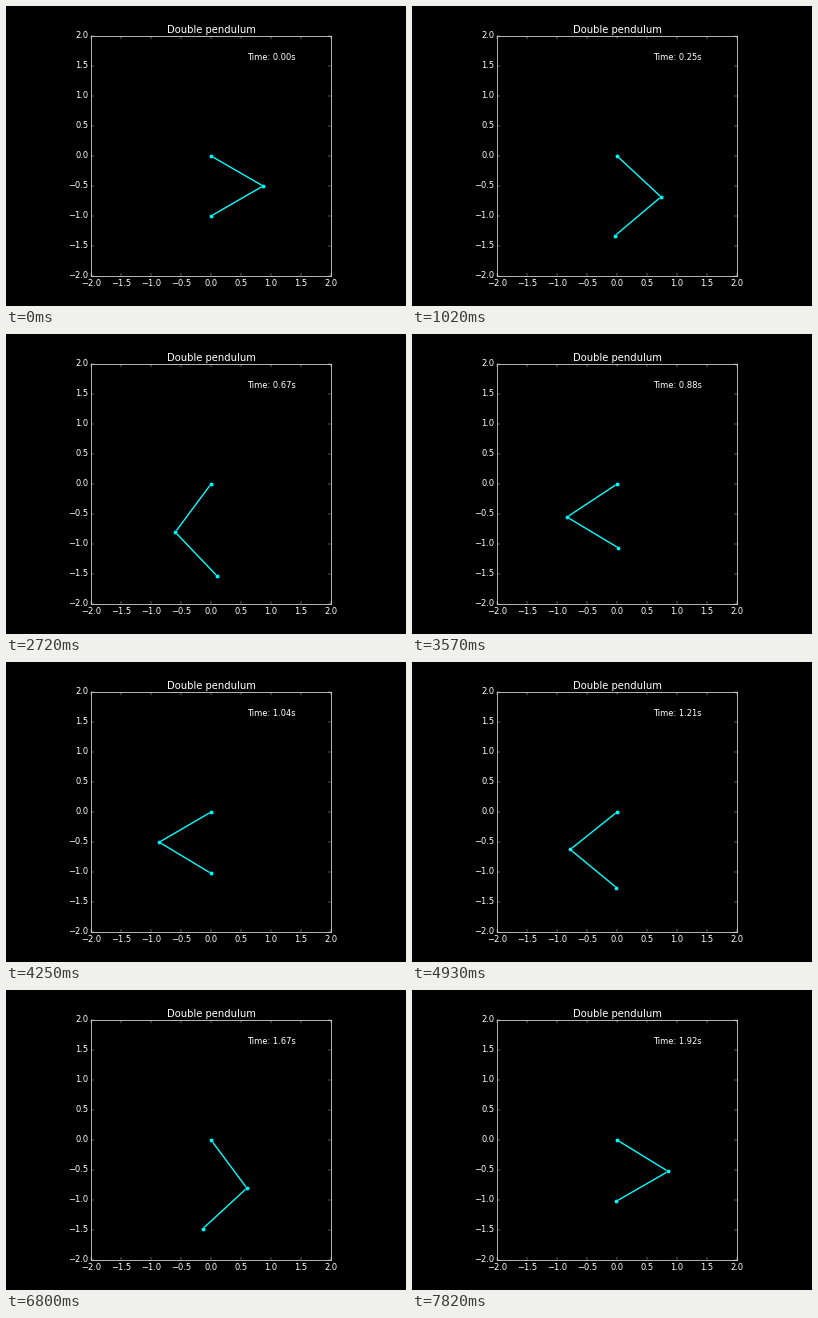
A matplotlib script for the animation above (7990 ms loop, 400 px wide and 300 px high).

```python
import numpy as np
import matplotlib.pyplot as plt
from matplotlib.animation import FuncAnimation

plt.style.use(["classic", "dark_background"])
plt.rcParams.update({"font.family": "DejaVu Sans", "savefig.dpi": "figure"})

G = 9.8            # gravity; both rods have length 1 and both bobs mass 1
FPS = 24           # simulated frames per second
FRAMES = 47
SUBSTEPS = 20


def deriv(state):
    """Equations of motion for state (angle 1, angle 2, rate 1, rate 2)."""
    a1, a2, w1, w2 = state
    c, s = np.cos(a1 - a2), np.sin(a1 - a2)
    f1 = -2 * G * np.sin(a1) - s * w2 ** 2
    f2 = -G * np.sin(a2) + s * w1 ** 2
    det = 2 - c * c
    return np.array([w1, w2, (f1 - c * f2) / det, (2 * f2 - c * f1) / det])


def rk4(state, h):
    k1 = deriv(state)
    k2 = deriv(state + h / 2 * k1)
    k3 = deriv(state + h / 2 * k2)
    k4 = deriv(state + h * k3)
    return state + h / 6 * (k1 + 2 * k2 + 2 * k3 + k4)


def simulate():
    state = np.array([np.pi / 3, -np.pi / 3, 0.0, 0.0])
    angles = []
    for _ in range(FRAMES):
        angles.append(state[:2])
        for _ in range(SUBSTEPS):
            state = rk4(state, 1 / (FPS * SUBSTEPS))
    return angles


angles = simulate()

fig = plt.figure(figsize=(8, 6), dpi=50)
ax = fig.add_subplot(111, aspect="equal", autoscale_on=False,
                     xlim=(-2, 2), ylim=(-2, 2))
ax.set_title("Double pendulum")
rods, = ax.plot([], [], "o-", color="cyan", lw=2, ms=6)
clock = ax.text(0.65, 0.9, "", transform=ax.transAxes)


def update(i):
    x = np.cumsum([0, *np.sin(angles[i])])
    y = np.cumsum([0, *-np.cos(angles[i])])
    rods.set_data(x, y)
    clock.set_text(f"Time: {i / FPS:.2f}s")
    return rods, clock


anim = FuncAnimation(fig, update, frames=FRAMES, interval=170,
                     repeat=True, repeat_delay=0)
plt.show()
```
